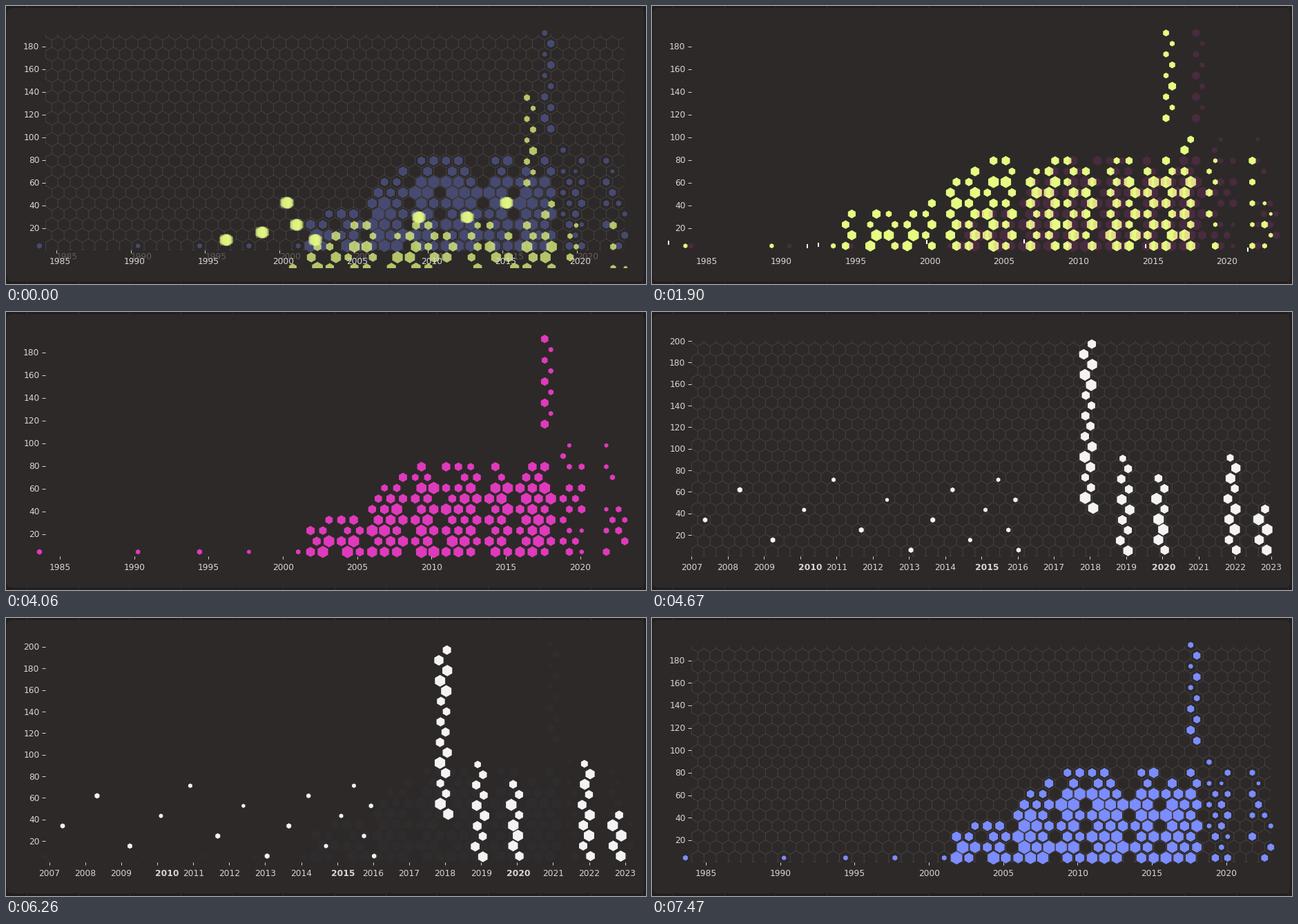
These frames come from a looping animation (927x404 px, 7490 ms). A matplotlib script:

```python
import numpy as np
import matplotlib.pyplot as plt
from matplotlib.animation import FuncAnimation
from matplotlib.collections import LineCollection, PolyCollection
from matplotlib.colors import to_rgb
from matplotlib.patches import Circle, FancyBboxPatch, Rectangle

W, H, DPI = 927, 404, 100
LOOP, STEP = 7490, 70
PX = 72 / DPI
STARTS = (0, 1900, 4060, 6260)

PANEL, EDGE, MESH, INK = "#2d2928", "#211e1d", "#484443", "#dad7d5"
YELLOW, PINK, WHITE, BLUE = "#e5fb82", "#df3abc", "#f5f2f3", "#7b8dff"

HALF_COL, ROW = 8.925, 15.47
ANGLES = np.radians(30 + 60 * np.arange(6))
UNIT_HEX = np.column_stack([np.cos(ANGLES), np.sin(ANGLES)])


def cell(row, col):
    """Centre of a honeycomb cell; columns count in half widths."""
    return 48.4 + HALF_COL * col, 348.6 - ROW * row


def hexagon(x, y, r):
    return UNIT_HEX * r + (x, y)


def smooth(v):
    v = np.clip(v, 0, 1)
    return v * v * (3 - 2 * v)


def mix(a, b, p):
    return a + (b - a) * p


def full_x(year):
    return 78.2 + 21.53 * (year - 1985)


def zoom_x(year):
    return 57.5 + 52.45 * (year - 2007)


# --- data -----------------------------------------------------------------

def steady_columns():
    return [c for c in range(44, 96) if c % 12 not in (0, 5)]


def paired_columns():
    return [2 * int(13.95 - 0.5 * odd + 1.62 * i) + odd
            for odd in (0, 1) for i in range(22)]


def build_layer(columns, skyline, outliers, tower_col, tower_rows, radii, seed):
    """Cells as (row, col) -> radius, filled up to the skyline."""
    rng = np.random.default_rng(seed)
    cells = {(0, col): rng.uniform(3.2, 4.2) for col in outliers}
    for col in columns:
        top = np.interp(col, *zip(*skyline))
        late = col > 83
        for row in range(col % 2, int(np.floor(top)) + 1, 2):
            if (row < 7 and not late) or rng.random() < 0.75:
                r = rng.uniform(3.4, 6.2) if late else rng.uniform(*radii)
                cells[row, col] = r * (0.8 if row > top - 1.5 else 1)
    for row in tower_rows:
        cells[row, tower_col + row % 2] = rng.uniform(3.4, 6.8)
    return cells


LATE_PEAKS = [(89, -1), (91, -1), (92, 10), (93, 7), (94, 4), (95, 3)]
STEADY_SKYLINE = [(43, 2), (46, 3), (53, 3), (56, 6), (62, 8), (84, 8), (86, 10),
                  (87, 7), (88, 8)] + LATE_PEAKS
PAIRED_SKYLINE = [(26, 3), (38, 3), (43, 7), (50, 8), (80, 8), (82, 10),
                  (85, 7), (86, 8), (87, -1)] + LATE_PEAKS
EARLY = (0, 16, 26, 34, 42)

pink_cells = build_layer(steady_columns(), STEADY_SKYLINE, EARLY, 82,
                         range(12, 21), (6.2, 9.2), 4)
blue_cells = build_layer(steady_columns(), STEADY_SKYLINE, EARLY, 82,
                         range(11, 21), (7.4, 9.8), 9)
yellow_cells = build_layer(paired_columns(), PAIRED_SKYLINE, (0, 14, 24), 78,
                           range(12, 21), (5.9, 9.1), 2)

# Cells that arrive as soft blurred sprites, with their starting points.
SPRITES = {(1, 27): (319, 340), (1, 37): (371, 329), (2, 40): (407, 286),
           (3, 43): (421, 318), (6, 56): (448, 340), (4, 66): (598, 307),
           (4, 72): (668, 307), (6, 76): (725, 286)}


def build_swarm():
    """Scattered early dots, then zigzag stacks given as (x, bottom, count)."""
    rng = np.random.default_rng(7)
    dots = [(531 - 454 * (1 - i / 15) ** 1.7, 346 - 14.6 * ((3 + 3 * i) % 8),
             rng.uniform(3, 4.2)) for i in range(16)]
    for x, bottom, count in ((632, 285, 17), (685, 347, 10), (737, 346, 8),
                             (841, 346, 10), (885, 346, 5)):
        for i in range(count):
            side = 5 if i % 2 == 0 else -5
            dots.append((x + side + rng.uniform(-2, 2), bottom - 14.9 * i,
                         rng.uniform(6.2, 9) * (0.8 if i == count - 1 else 1)))
    return dots


swarm = build_swarm()

# --- stage ----------------------------------------------------------------

fig = plt.figure(figsize=(W / DPI, H / DPI), dpi=DPI, facecolor=EDGE)
ax = fig.add_axes([0, 0, 1, 1])
ax.set_xlim(0, W)
ax.set_ylim(H, 0)
ax.axis("off")

for x in np.arange(30.5, W, 74.2):
    ax.plot([x, x], [0, H], color="#35302f", lw=PX, zorder=0)
ax.add_patch(FancyBboxPatch((5, 7), 915.5, 389.5, boxstyle="round,pad=0,rounding_size=4",
                            fc=PANEL, ec=PANEL, lw=8 * PX, zorder=1))

mesh_lines = [hexagon(*cell(row, col), ROW * 2 / 3)[[5, 0, 1, 2]]
              for row in range(22) for col in range(row % 2, 97, 2)]
mesh = LineCollection(mesh_lines, colors=MESH, lw=0.9 * PX, zorder=2)
ax.add_collection(mesh)
mesh.set_clip_path(Rectangle((57, 41), 839.5, 313.5, transform=ax.transData))

shapes = PolyCollection([], lw=0, zorder=3)
ax.add_collection(shapes)
shapes.set_clip_path(Rectangle((0, 0), W, 381, transform=ax.transData))

x_ticks = LineCollection([], zorder=4)
y_ticks = LineCollection([], colors=INK, lw=PX, zorder=4)
ax.add_collection(x_ticks)
ax.add_collection(y_ticks)
dot = ax.add_patch(Circle((783, 372), 3, color="#423e3d", lw=0, zorder=4))


def label(text, ha="center"):
    return ax.text(0, 0, text, color=INK, fontsize=12.2 * PX, family="DejaVu Sans",
                   ha=ha, va="center_baseline", zorder=5)


year_text = {y: label(str(y)) for y in range(1985, 2024)}
ghost_text = {y: label(str(y)) for y in range(1985, 2021, 5)}
value_text = {v: label(str(v), "right") for v in range(20, 201, 20)}

scatter = np.random.default_rng(3)
tick_flight = {y: (scatter.uniform(-50, 50), scatter.uniform(-13, -2))
               for y in ghost_text}


# --- motion ---------------------------------------------------------------

def zoom_at(phase, dt):
    """(horizontal zoom, vertical zoom): 0 is the full range, 1 the late years."""
    if phase == 2:
        z = smooth((dt - 60) / 500)
        return z, z
    if phase == 3:
        return 1 - smooth((dt + 25) / 500), np.exp(-dt / 745)
    return 0.0, 0.0


def fade_in(dt):
    return 1 - np.exp(-dt / 150)


def fade_out(dt):
    return np.exp(-max(0, dt - 50) / 110)


def add_cells(out, cells, color, alpha, dx=0.0, dy=0.0, skip=()):
    if alpha < 0.01:
        return
    rgba = (*to_rgb(color), alpha)
    for pos, r in cells.items():
        if pos not in skip:
            x, y = cell(*pos)
            out.append((hexagon(x + dx, y + dy, r), rgba))


def add_swarm(out, zoom, alpha):
    if alpha < 0.01:
        return
    rgba = (*to_rgb(WHITE), alpha)
    for x, y, r in swarm:
        far = full_x(2007 + (x - 57.5) / 52.45)
        out.append((hexagon(mix(far, x, zoom), y, r), rgba))


def add_sprites(out, dt, away):
    for pos, start in SPRITES.items():
        x, y = cell(*pos)
        x, y = mix(x, start[0], away), mix(y, start[1], away)
        if dt < 100:
            for left, right, alpha in ((-9, 7, 0.28), (0, 4, 0.6)):
                box = [(x + left, y - 8), (x + right, y - 8),
                       (x + right, y + 8), (x + left, y + 8)]
                out.append((np.array(box), (0.9, 0.9, 0.86, alpha)))
        spread = 4.5 - 2 * away
        for dx in np.linspace(-spread, spread, 9):
            out.append((hexagon(x + dx, y, 8.8), (*to_rgb(YELLOW), 0.28)))


def draw_shapes(phase, dt, zoom):
    out = []
    if phase == 0:
        add_cells(out, blue_cells, BLUE, 0.45 * np.exp(-dt / 120))
        away = (1 - np.clip((dt - 40) / 500, 0, 1)) ** 3
        blurred = dt < 740
        add_cells(out, yellow_cells, YELLOW, 1 - 0.26 * away, 10 * away, 94 * away,
                  SPRITES if blurred else ())
        if blurred:
            add_sprites(out, dt, away)
    elif phase == 1:
        gone = smooth((dt - 50) / 320)
        add_cells(out, yellow_cells, YELLOW, fade_out(dt), 10 * gone, 94 * gone)
        add_cells(out, pink_cells, PINK, fade_in(dt), 8 * (1 - smooth(dt / 300)))
    elif phase == 2:
        add_cells(out, pink_cells, PINK, fade_out(dt))
        add_swarm(out, zoom, smooth((dt - 60) / 220))
    else:
        drift = 1 - smooth(dt / 400)
        add_cells(out, blue_cells, BLUE, fade_in(dt), 8 * drift, -2 * drift)
        add_swarm(out, zoom, 1 - smooth((dt - 30) / 330))
    shapes.set_verts([v for v, _ in out])
    shapes.set_facecolor([c for _, c in out])


def draw_years(phase, dt, zoom):
    first = phase == 0 and dt < 70
    flying = phase == 1 and dt < 800
    spread = min(1.3, np.exp((375 - dt) / 150)) if flying else 0
    ticks = []
    for year, text in year_text.items():
        five = year % 5 == 0
        alpha = 1.0 if five else zoom
        tx = mix(full_x(year), zoom_x(year), zoom)
        lag = 1.2 * (2022 - year) * zoom if five else 0
        visible = 50 < tx < 906 and alpha > 0.02
        text.set(visible=visible, position=(tx + lag + 1.3 * flying, 370),
                 alpha=alpha, weight="bold" if five and zoom > 0.5 else "normal")
        if visible and alpha > 0.5:
            dx, dy = tick_flight.get(year, (0, 0))
            x, y = tx - 5 * first + dx * spread, 354.5 + dy * spread
            ticks.append([(x, y), (x, y + (6 if flying else 4.5))])
    x_ticks.set(segments=ticks, linewidth=(2 if flying else 1) * PX,
                color="white" if flying else INK)
    for year, text in ghost_text.items():
        text.set(visible=first, position=(full_x(year) + 10.5, 363), alpha=0.3)
    dot.set_visible(flying and 100 < dt < 600)


def draw_values(zoom, lift):
    scale = mix(1.65, 1.567, lift)
    ticks = []
    for value, text in value_text.items():
        y = 355 - scale * value
        visible = value < 200 or zoom > 0.5
        text.set(visible=visible, position=(48.5, y))
        if visible:
            ticks.append([(52, y + 0.5), (57, y + 0.5)])
    y_ticks.set_segments(ticks)


def draw(i):
    t = (i + 0.5) * STEP
    phase = sum(t >= s for s in STARTS) - 1
    dt = t - STARTS[phase]
    zoom, lift = zoom_at(phase, dt)
    mesh.set_alpha(1.0 if phase == 0 else smooth((dt - 200) / 130))
    draw_shapes(phase, dt, zoom)
    draw_years(phase, dt, zoom)
    draw_values(zoom, lift)
    return []


anim = FuncAnimation(fig, draw, frames=LOOP // STEP, interval=STEP,
                     init_func=lambda: [], repeat=True, repeat_delay=0)
plt.show()
```
